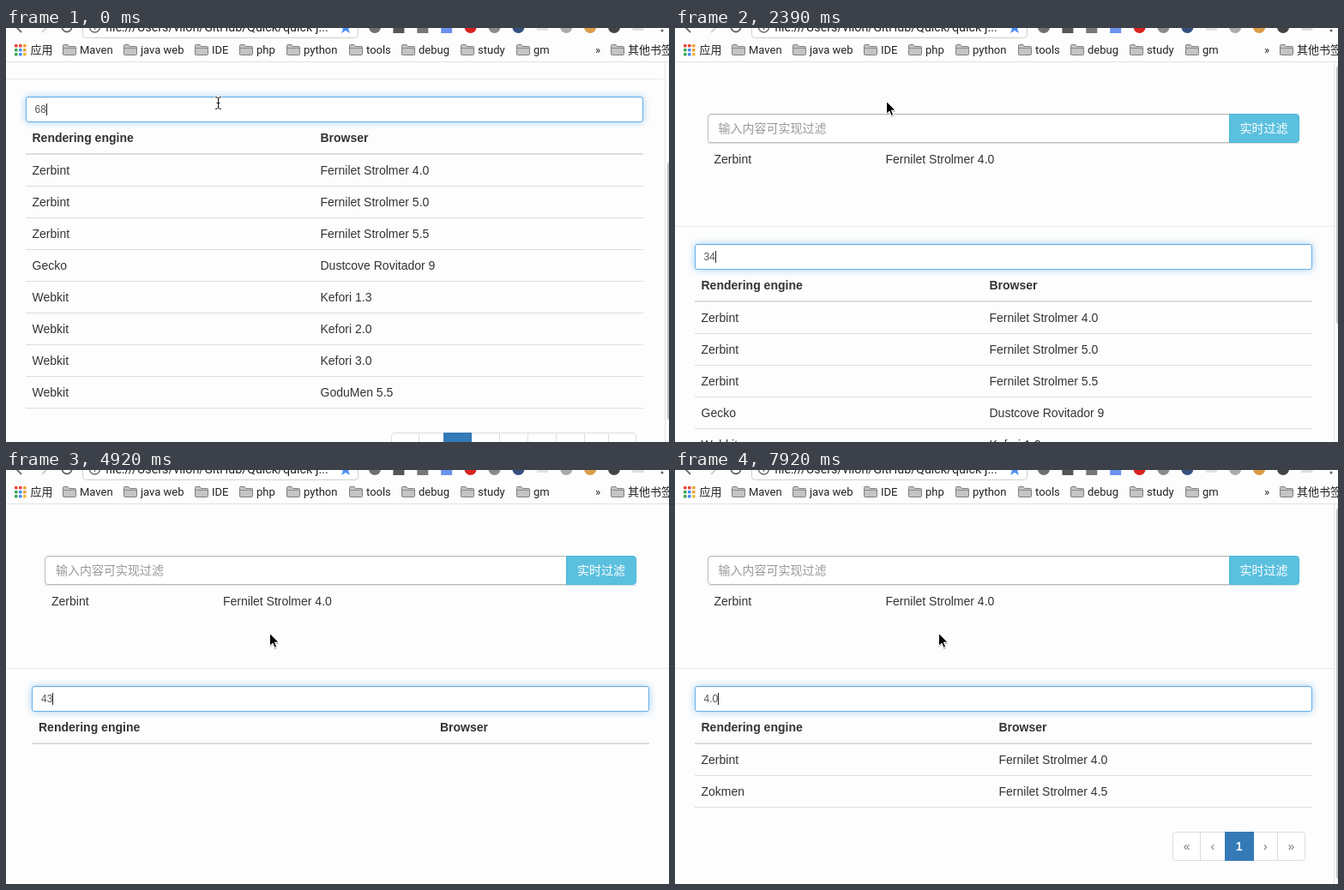
These frames come from a looping animation (773x483 px, 8000 ms). An HTML page:

```html
<!DOCTYPE html>
<html lang="zh">
<head>
<meta charset="utf-8">
<title>Table filter</title>
<style>
html, body { margin: 0; width: 100%; height: 100%; overflow: hidden; background: #fdfdfd; }
body { position: relative; color: #333; font: 14px/20px "Liberation Sans", Arial, "Noto Sans CJK SC", "Noto Sans CJK", sans-serif; }
div, span { box-sizing: border-box; }
svg { position: absolute; left: 0; top: 0; }
#bar text { font: 13px Roboto, "Noto Sans CJK SC", "Noto Sans CJK", sans-serif; fill: #222; }
#bar .url { font-size: 14.3px; }
#view { position: absolute; left: 0; top: 40px; width: 773px; height: 443px; overflow: hidden; }
#page { position: absolute; left: 0; top: 0; width: 773px; height: 700px; white-space: nowrap; }
#page > * { position: absolute; }
.field { left: 45px; top: 60px; width: 609px; height: 34px; padding: 6px 12px; border: 1px solid #bbb; border-radius: 4px 0 0 4px; box-shadow: inset 0 1px 1px rgba(0,0,0,.075); color: #999; background: #fff; }
.btn { left: 653px; top: 60px; width: 82px; height: 34px; padding: 6px 12px; border: 1px solid #46b8da; border-radius: 0 4px 4px 0; background: #5bc0de; color: #fff; font-weight: 500; }
.one { left: 45px; top: 94px; width: 690px; border-top: 1px solid #ddd; --col: 200px; }
hr { left: 0; top: 191px; width: 800px; height: 1px; margin: 0; border: 0; background: #eaeaea; }
.search { left: 30px; top: 212px; width: 720px; height: 30px; padding: 5px 10px; border: 1px solid #66afe9; border-radius: 3px; background: #fff; box-shadow: inset 0 1px 1px rgba(0,0,0,.075), 0 0 8px rgba(102,175,233,.6); font-size: 12px; line-height: 18px; color: #555; }
.search i { display: inline-block; width: 1px; height: 14px; margin-right: -1px; background: #222; vertical-align: -3px; }
.search .hint { color: #999; }
.table { left: 30px; top: 242px; width: 720px; }
.row { position: relative; height: 37px; padding: 8px; border-bottom: 1px solid #ddd; }
.row.one { position: absolute; border-bottom: 0; padding-top: 8px; }
.row b, .row span { position: absolute; left: 8px; }
.row :last-child { left: calc(var(--col) + 8px); }
.row.head { height: 38px; border-bottom: 2px solid #ddd; }
.pages { display: flex; justify-content: flex-end; width: 712.5px; margin-top: 28px; }
.pages span { width: 33.8px; height: 34px; margin-left: -1px; padding: 6px 0; border: 1px solid #ddd; background: #fff; color: #777; text-align: center; }
.pages .end { width: 33px; }
.pages .step { width: 29.5px; }
.pages :first-child { border-radius: 4px 0 0 4px; }
.pages :last-child { border-radius: 0 4px 4px 0; }
.pages .on { position: relative; background: #337ab7; border-color: #337ab7; color: #fff; font-weight: bold; }
#scroll { position: absolute; right: 0; top: 0; width: 5px; height: 443px; background: #fbfbfb; border-left: 1px solid #e6e6e6; overflow: hidden; }
#thumb { position: absolute; left: 2px; width: 8px; border-radius: 4px; background: #c1c1c1; }
</style>
</head>
<body>
<svg id="bar" width="773" height="40"></svg>
<div id="view">
  <div id="page">
    <div class="field">输入内容可实现过滤</div>
    <div class="btn">实时过滤</div>
    <div class="row one"><span>Zerbint</span><span>Fernilet Strolmer 4.0</span></div>
    <hr>
    <div class="search"></div>
    <div class="table"></div>
  </div>
  <div id="scroll"><div id="thumb"></div></div>
</div>
<svg width="773" height="483">
  <g id="beam" fill="none" stroke-linecap="round">
    <path d="M244.5 80.5q3 0 3 2v10q0 2-3 2m6-14q-3 0-3 2m0 10q0 2 3 2m-4.500-7h3" stroke="#fff" stroke-width="2.500"/>
    <path d="M244.500 80.500q3 0 3 2v10q0 2-3 2m6-14q-3 0-3 2m0 10q0 2 3 2m-4.500-7h3" stroke="#111"/>
  </g>
  <g id="arrow">
    <path d="M0 1.500v15l3.500-3 2.300 5.200 2.800-1.200-2.300-5.100h4.700z" fill="#000" opacity=".25"/>
    <path d="M0 0v14.800l3.400-3.200 2.300 5.200 2.500-1.100-2.300-5.100h4.600z" fill="#000" stroke="#fff"/>
  </g>
</svg>
<script>
const $ = s => document.querySelector(s);

// Browser bar
const folder = x => `<path d="M${x + .5} 31V20.500q0-1 1-1h4.500l1.500 2h7q1 0 1 1V30.500q0 1-1 1h-13q-1 0-1-1z" fill="#c4c4c4" stroke="#808080"/><path d="M${x + 1} 23.500h14" stroke="#8c8c8c"/>`;
const label = (x, s) => `<text x="${x}" y="30">${s}</text>`;
const marks = { 66: 'Maven', 137: 'java web', 220: 'IDE', 272: 'php', 327: 'python', 400: 'tools', 461: 'debug', 530: 'study', 595: 'gm', 705: '其他书签' };
const dots = ['#e8453c', '#e8453c', '#f0a030', '#3aa757', '#4688f1', '#f0a030', '#3aa757', '#4688f1', '#f0b63a'];
const tools = ['#707070', '#555', '#777', '#6b92ee', '#d8231f', '#8a8a8a', '#34507f', '#e2e2e2', '#aaa', '#d99b45', '#444', '#ddd'];
$('#bar').innerHTML = `
  <path d="M0 39.500h773" stroke="#e2e2e2"/>
  <g fill="none" stroke-width="1.800">
    <path d="M18 5l-7-7" stroke="#666"/><path d="M42 5l7-7" stroke="#ccc"/>
    <circle cx="71" cy="-1" r="5.500" stroke="#666"/>
    <rect x="89.500" y="-17" width="321" height="28.500" rx="4" fill="#fff" stroke="#d0d0d0" stroke-width="1"/>
    <circle cx="103.500" cy="-1" r="6" stroke="#666" stroke-width="1.400"/>
    <path d="M103.500-3v5" stroke="#666" stroke-width="1.400"/>
  </g>
  <text class="url" x="116" y="4">file:///Users/vilon/GitHub/Quick/quick-j...</text>
  <path d="M396-8l2 6 6 0-5 3 2 5-5-3-5 3 2-5-5-3 6 0z" fill="#4a8ff5"/>` +
  tools.map((c, i) => [1, 2, 3, 7, 11].includes(i)
    ? `<rect x="${423.500 + 27.900 * i}" y="-8" width="13" height="${i == 7 || i == 11 ? 11 : 14}" fill="${c}"/>`
    : `<circle cx="${430 + 27.900 * i}" cy="-1" r="7" fill="${c}"/>`).join('') +
  '<circle cx="765" cy="3" r="1.600" fill="#666"/>' +
  dots.map((c, i) => `<rect x="${10 + i % 3 * 5}" y="${19 + (i / 3 | 0) * 5}" width="3.600" height="3.600" rx="1" fill="${c}"/>`).join('') +
  label(28.500, '应用') + label(687, '»') +
  Object.entries(marks).map(([x, s]) => folder(+x) + label(+x + 20, s)).join('');

// Table contents
const ie = v => ['Zerbint', 'Fernilet Strolmer ' + v];
const kit = s => ['Webkit', s];
const full = [ie('4.0'), ie('5.0'), ie('5.5'), ['Gecko', 'Dustcove Rovitador 9'],
  kit('Kefori 1.3'), kit('Kefori 2.0'), kit('Kefori 3.0'), kit('GoduMen 5.5')];
const found = [ie('4.0'), ['Zokmen', 'Fernilet Strolmer 4.5']];
const NONE = { rows: [], col: 468 };
const FULL = { rows: full, col: 336, pages: 5, thumb: 302 };
const FOUND = { rows: found, col: 347, pages: 1, thumb: 434 };

const cell = (s, c = '') => `<span class="${c}">${s}</span>`;
const pager = n => `<div class="pages">${cell('«', 'end')}${cell('‹', 'step')}${
  Array.from({ length: n }, (_, i) => cell(i + 1, i ? '' : 'on')).join('')}${cell('›', 'step')}${cell('»', 'end')}</div>`;
const table = v => '<div class="row head"><b>Rendering engine</b><b>Browser</b></div>' +
  v.rows.map(r => `<div class="row">${r.map(s => cell(s)).join('')}</div>`).join('') +
  (v.pages ? pager(v.pages) : '');

// Start time, typed text, caret shown, table view
const steps = [
  [0, '68', 1, FULL], [450, '68', 1, NONE], [1040, '68', 0, NONE], [1190, '68', 1, NONE],
  [1340, '6', 1, NONE], [1490, '', 0, NONE], [1790, '', 0, FULL], [2090, '', 1, FULL],
  [2240, '3', 1, FULL], [2390, '34', 1, FULL], [2840, '34', 1, NONE], [3890, '3', 1, NONE],
  [4030, '', 0, NONE], [4330, '', 0, FULL], [4480, '4', 1, FULL], [4770, '43', 1, FULL],
  [4920, '43', 1, NONE], [5370, '43', 0, NONE], [5520, '43', 1, NONE], [5670, '4', 1, NONE],
  [5820, '', 0, NONE], [6120, '', 0, FULL], [6270, '4', 1, FULL], [6720, '4', 0, FULL],
  [7020, '4.', 1, FULL], [7470, '4.0', 1, FULL], [7620, '4.0', 0, FOUND], [7920, '4.0', 1, FOUND]
];
let shown, view;

function show(step) {
  const [start, text, caret, v] = shown = step;
  const bar = caret ? '<i></i>' : '';
  $('.search').innerHTML = text ? text + bar : bar + '<span class="hint">Search in table</span>';
  const scroll = start ? 0 : 172;
  $('#page').style.top = -scroll + 'px';
  $('#thumb').style.top = (scroll ? 116 : 4) + 'px';
  if (v === view) return;
  view = v;
  $('.table').innerHTML = table(v);
  $('.table').style.setProperty('--col', v.col + 'px');
  $('#page').style.left = v.thumb ? '-7.5px' : 0;
  $('#scroll').style.display = v.thumb ? '' : 'none';
  $('#thumb').style.height = (v.thumb || 0) + 'px';
}

function draw(now) {
  const t = now % 8000;
  const step = steps.findLast(s => s[0] <= t);
  if (step !== shown) show(step);
  const move = Math.min(4, Math.max(0, Math.floor((t - 2840) / 150))) / 4;
  $('#beam').style.display = t < 590 ? '' : 'none';
  $('#arrow').style.display = t < 590 ? 'none' : '';
  $('#arrow').setAttribute('transform', `translate(${246.500 + 61 * move} ${85.500 + 105 * move})`);
}

const begin = performance.now();
function tick() {
  draw(performance.now() - begin);
  requestAnimationFrame(tick);
}
tick();
</script>
</body>
</html>
```
